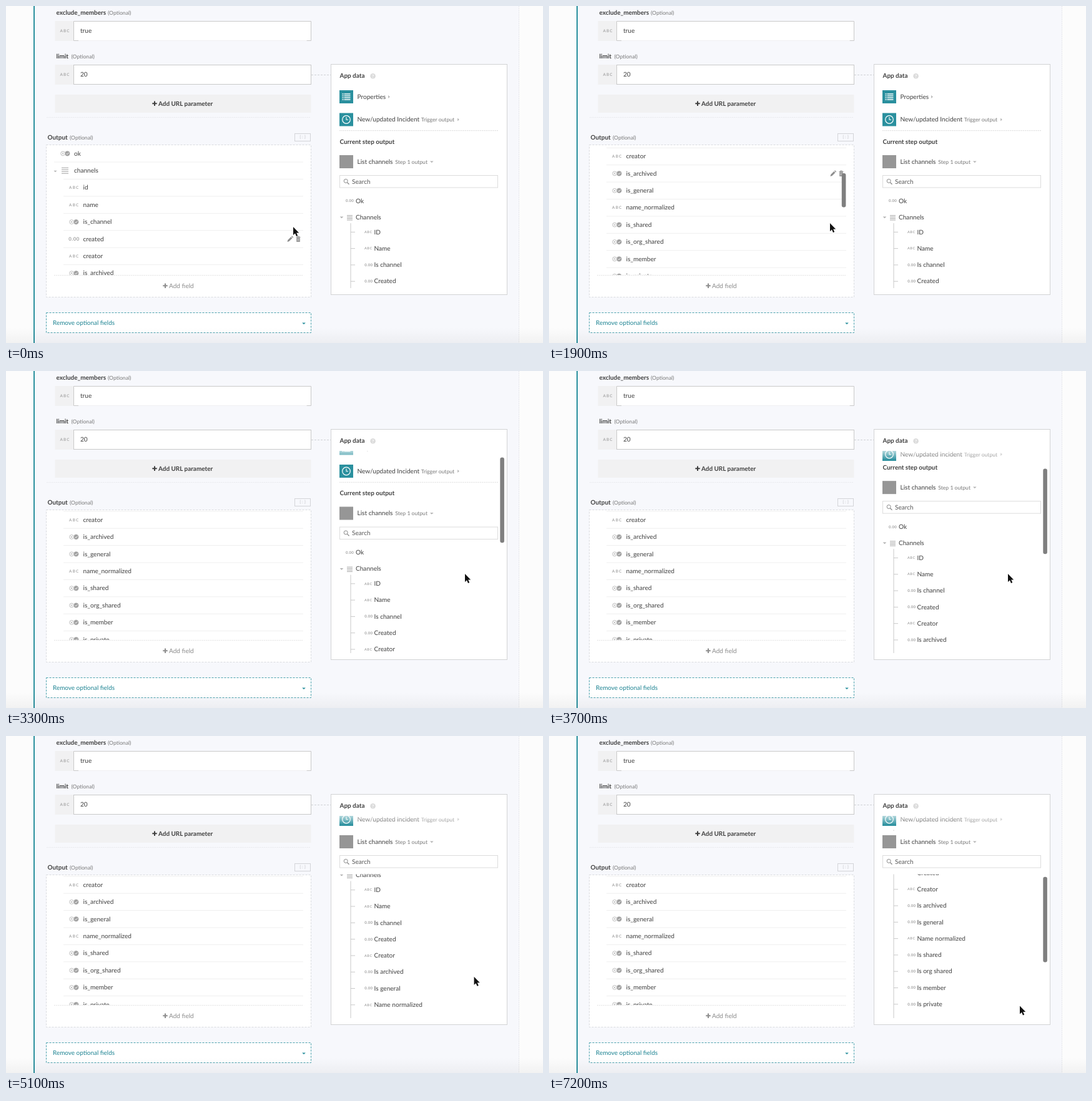
Animation, 860 px wide and 540 px high, one loop 7.3 s. Source, as an HTML page:

```html
<!DOCTYPE html>
<html lang="en">
<head>
<meta charset="utf-8">
<title>Output fields</title>
<style>
html, body { margin: 0; width: 860px; height: 540px; overflow: hidden; background: #fcfcfc; }
svg { display: block; }
text { font-family: Lato, "Open Sans", sans-serif; text-rendering: geometricPrecision; white-space: pre; }
</style>
</head>
<body>
<svg id="stage" width="860" height="540" viewBox="0 0 860 540">
  <defs>
    <clipPath id="listClip"><rect x="65" y="223" width="423" height="208"/></clipPath>
    <clipPath id="panelClip"><rect x="521" y="128" width="281" height="324"/></clipPath>
    <linearGradient id="topFade" x2="0" y2="1">
      <stop offset="0" stop-color="#fff" stop-opacity=".65"/><stop offset="1" stop-color="#fff" stop-opacity="0"/>
    </linearGradient>
    <linearGradient id="floor" x2="0" y2="1">
      <stop offset="0" stop-opacity="0"/><stop offset="1" stop-opacity=".04"/>
    </linearGradient>
  </defs>
</svg>
<script>
const NS = 'http://www.w3.org/2000/svg';
const stage = document.getElementById('stage');
const INK = '#404040', TEAL = '#2a909e', GREY = '#a0a0a0';

function el(parent, tag, attrs) {
  const node = document.createElementNS(NS, tag);
  for (const key in attrs) node.setAttribute(key, attrs[key]);
  return parent.appendChild(node);
}
const group = (parent, attrs) => el(parent, 'g', attrs);
const path = (p, d, attrs) => el(p, 'path', { d, fill: 'none', ...attrs });
const box = (p, x, y, width, height, fill, attrs) => el(p, 'rect', { x, y, width, height, fill, ...attrs });
const line = (p, x1, y1, x2, y2, stroke, attrs) => el(p, 'line', { x1, y1, x2, y2, stroke, ...attrs });

// y is the middle of the capitals
function text(p, x, y, str, { size = 10.1, fill = INK, weight = 400, ...rest } = {}) {
  const node = el(p, 'text', { x, y: y + size * 0.32, 'font-size': size, fill, 'font-weight': weight, ...rest });
  node.textContent = str;
  return node;
}
const bold = (p, x, y, str) => text(p, x, y, str, { size: 9.95, weight: 700 });
const note = (p, x, y, str) => text(p, x, y, str, { size: 8.6, fill: '#777' });
const plus = (p, x, y, stroke) =>
  path(p, `M${x - 3.7} ${y}h7.4M${x} ${y - 3.7}v7.4`, { stroke, 'stroke-width': 2 });
const bars = (p, x, y, w, gap, n, stroke) => {
  for (let i = 0; i < n; i++) line(p, x, y + (i - (n - 1) / 2) * gap, x + w, y + (i - (n - 1) / 2) * gap, stroke);
};
const caret = (p, x, y, fill, r = 3) => path(p, `M${x - r} ${y - r / 2}h${2 * r}l${-r} ${r}z`, { fill });
const chevron = (p, x, y) => path(p, `M${x - 1.3} ${y - 2.4}l2.6 2.4l-2.6 2.4z`, { fill: '#b5b5b5' });

function typeIcon(p, x, y, type, small) {
  if (type === 'bool') {
    el(p, 'circle', { cx: x + 3.6, cy: y, r: 3.4, fill: 'none', stroke: '#b0b0b0', 'stroke-width': .8 });
    path(p, `M${x + 2.3} ${y - 1.3}l2.6 2.6m0-2.6l-2.6 2.6`, { stroke: '#a8a8a8', 'stroke-width': .8 });
    el(p, 'circle', { cx: x + 10.8, cy: y, r: 4.3, fill: '#a0a0a0', stroke: '#fff', 'stroke-width': .6 });
    path(p, `M${x + 9} ${y}l1.4 1.4l2.6-2.8`, { stroke: '#fff' });
  } else if (type === 'num') {
    text(p, x - (small ? .3 : 1.2), y, '0.00', {
      size: small ? 6 : 7.8, fill: GREY, weight: 700, 'letter-spacing': small ? .35 : .55 });
  } else {
    text(p, x - .4, y, 'ABC', {
      size: small ? 5.4 : 6.3, fill: '#a8a8a8', weight: 700, 'letter-spacing': small ? .5 : 1.2 });
  }
}

function field(y, label, labelEnd, value, open) {
  bold(stage, 80.5, y - 29, label);
  note(stage, labelEnd + 4, y - 28.5, '(Optional)');
  box(stage, 78.5, y - 16, 30, 32, '#f1f1f2');
  box(stage, 108.5, y - 15.5, 380, 31, '#fff', open ? {} : { stroke: '#c9c9c9' });
  if (open) {
    path(stage, `M116 ${y + 15.5}h-7.5v-31h380v31h-7`, { stroke: '#c9c9c9' });
    line(stage, 116, y + 15.5, 481, y + 15.5, '#f0f0f2');
  }
  typeIcon(stage, 86.8, y, 'abc');
  text(stage, 119, y, value);
}

// Page and left column
box(stage, 45, 0, 776, 540, '#f7f8fc');
box(stage, 44, 0, 2, 540, TEAL);
line(stage, 821.5, 0, 821.5, 540, '#e4e6ea', { 'stroke-dasharray': '2 1' });
field(40, 'exclude_members', 159, 'true', true);
field(110, 'limit', 100.5, '20', false);
box(stage, 78.5, 142, 410, 29, '#f1f1f2');
plus(stage, 238, 156.2, INK);
bold(stage, 244, 156.5, 'Add URL parameter');
line(stage, 65, 178.5, 488, 178.5, '#e9eaee', { 'stroke-dasharray': '2 1' });
bold(stage, 66.5, 211, 'Output');
note(stage, 102, 211.5, '(Optional)');
box(stage, 462.5, 204.5, 25, 12, 'none', { stroke: '#d3d4d8' });
text(stage, 475, 210, '{ : }', { size: 7, fill: '#c4c5ca', 'text-anchor': 'middle' });

// Field list
box(stage, 64.5, 222.5, 424, 244, '#fff', { stroke: '#d9dbdf', 'stroke-dasharray': '3 2' });
line(stage, 77, 431.5, 476, 431.5, '#e4e4e4', { 'stroke-dasharray': '2 1' });
plus(stage, 255, 448.2, '#8d8d8d');
text(stage, 261, 448.5, 'Add field', { fill: '#8d8d8d' });

const FIELDS = [
  ['id', 'abc'], ['name', 'abc'], ['is_channel', 'bool'], ['created', 'num'], ['creator', 'abc'],
  ['is_archived', 'bool'], ['is_general', 'bool'], ['name_normalized', 'abc'], ['is_shared', 'bool'],
  ['is_org_shared', 'bool'], ['is_member', 'bool'], ['is_private', 'bool']
];
const listView = group(stage, { 'clip-path': 'url(#listClip)' });
const list = group(listView);
const rowY = i => 236.4 + 27.4 * i;
typeIcon(list, 87.5, rowY(0), 'bool');
text(list, 109, rowY(0), 'ok');
line(list, 77, 250, 476, 250, '#efefef');
caret(list, 79, 265, '#b5b5b5', 2.6);
bars(list, 89, rowY(1), 11, 3, 4, '#a3a3a3');
text(list, 109, rowY(1), 'channels');
line(list, 92, 277.4, 476, 277.4, '#efefef');
FIELDS.forEach(([name, type], i) => {
  const y = rowY(i + 2);
  typeIcon(list, 101.5, y, type);
  text(list, 123.5, y, name);
  line(list, 92, y + 13.7, 476, y + 13.7, '#efefef');
});
const tools = group(list);
path(tools, 'M450.5 4.5l.8-3l5-5l2.2 2.2l-5 5zM457-4.2l1-.9l2.2 2.2l-1 .9z', { fill: '#8e8e8e' });
path(tools, 'M464.5-2.8h7M466.5-3v-1.3h3v1.3', { stroke: '#8e8e8e' });
path(tools, 'M465.2-2h5.6v6.5h-5.6z', { fill: '#8e8e8e' });
path(tools, 'M467-.5v3.6m2-3.6v3.6', { stroke: '#fff', 'stroke-width': .6 });
const listThumb = box(stage, 468.8, 0, 6.6, 54.5, '#7f7f7f', { rx: 3 });

// Drop-down
box(stage, 64.5, 491.5, 424, 32, '#fff', { stroke: '#4ba1ad', 'stroke-dasharray': '3 2' });
text(stage, 75, 507.8, 'Remove optional fields', { size: 9.95, fill: '#1f8493' });
caret(stage, 477, 508.8, TEAL, 2.8);

// Data panel
line(stage, 489, 110.5, 520, 110.5, '#cfd1d5', { 'stroke-dasharray': '3 2' });
box(stage, 520.5, 93.5, 282, 369, '#fff', { stroke: '#d2d3d4' });
bold(stage, 534.5, 111.5, 'App data');
el(stage, 'circle', { cx: 587.6, cy: 112.2, r: 4.3, fill: '#dcdcdc' });
text(stage, 587.6, 112.5, '?', { size: 7, fill: '#fff', weight: 700, 'text-anchor': 'middle' });

const panel = group(stage, { 'clip-path': 'url(#panelClip)' });
const tree = group(panel);
const tile = (p, y, fill) => box(p, 534, y - 10.5, 22, 21, fill);

tile(tree, 145.5, TEAL);
for (const dy of [-4.5, -1.5, 1.5, 4.5])
  path(tree, `M538.5 ${145.5 + dy}h2m1 0h10`, { stroke: '#fff', 'stroke-width': 1.5 });
text(tree, 562.5, 145.5, 'Properties');
chevron(tree, 613.5, 145.5);
line(tree, 534, 199.7, 788, 199.7, '#dadada', { 'stroke-dasharray': '2 1' });
bold(tree, 534.5, 217.5, 'Current step output');

typeIcon(tree, 544.2, 312.5, 'num', true);
text(tree, 560, 312.5, 'Ok');
caret(tree, 537.5, 338.8, '#b0b0b0', 2.8);
bars(tree, 546, 339.3, 9, 2.4, 4, '#a6a6a6');
text(tree, 560, 338.7, 'Channels');
line(tree, 552, 348, 552, 700, '#c9c9c9');
FIELDS.forEach(([name, type], i) => {
  const y = 362.3 + 26.3 * i;
  const words = name.replace(/_/g, ' ');
  const label = name === 'id' ? 'ID' : words[0].toUpperCase() + words.slice(1);
  line(tree, 552, y, 559, y, '#c9c9c9');
  typeIcon(tree, 574.5, y, type === 'abc' ? 'abc' : 'num', true);
  text(tree, 589.5, y, label);
});

// Sticky parts of the panel
const step = group(panel);
box(step, 522, 232, 270, 69.5, '#fff');
tile(step, 249.5, '#969696');
text(step, 562.5, 249.5, 'List channels');
note(step, 623.3, 250, 'Step 1 output');
caret(step, 681.8, 249.8, '#b5b5b5', 2.8);
box(step, 534.5, 271.5, 253, 19.5, '#fff', { stroke: '#dcdcdc' });
el(step, 'circle', { cx: 544.2, cy: 280.4, r: 3, fill: 'none', stroke: '#888' });
line(step, 546.4, 282.6, 549.5, 285.7, '#888', { 'stroke-width': 1.3 });
text(step, 554, 281.5, 'Search', { fill: '#5a5a5a' });

const trigger = group(panel);
box(trigger, 522, 168, 270, 31, '#fff');
tile(trigger, 182, TEAL);
el(trigger, 'circle', { cx: 545, cy: 182, r: 6.3, fill: 'none', stroke: '#fff', 'stroke-width': 1.2 });
path(trigger, 'M545 178v4.2h3', { stroke: '#fff', 'stroke-width': 1.1 });
const triggerName = text(trigger, 562.5, 182, '');
note(trigger, 664.8, 182.3, 'Trigger output');
chevron(trigger, 724.5, 182);

const fade = box(panel, 522, 128, 270, 15, 'url(#topFade)');
const panelThumb = box(stage, 791.3, 0, 6.6, 136.8, '#7f7f7f', { rx: 3 });

box(stage, 0, 515, 860, 25, 'url(#floor)');
const cursor = path(stage, 'M0 0v13l3-2.7l2 4.7l2.2-.9l-2-4.7h4z',
  { fill: '#111', stroke: '#fff', 'stroke-width': .9, 'paint-order': 'stroke' });

// Motion: [ms, value]
const LOOP = 7300, STEP = 100;
const KEYS = {
  x: [[0, 460], [200, 450], [2300, 450], [2500, 500], [2800, 700], [3000, 735], [4500, 735], [5200, 752], [5500, 767], [5700, 754]],
  y: [[0, 354], [200, 348], [2300, 348], [2500, 346], [2800, 331], [3000, 325], [4500, 325], [5200, 396], [5500, 440], [5700, 432.5]],
  list: [[600, 0], [800, 10], [1100, 57.5], [1300, 78], [1450, 82], [1600, 100], [1900, 159.8], [2100, 162.3]],
  listBar: [[600, 0], [700, 1], [2300, 1], [2600, 0]],
  panel: [[3000, 0], [3100, 4], [3300, 21.5], [4100, 104.2], [4300, 115.6], [6300, 115.6], [6500, 128], [7000, 208], [7200, 221.8]],
  panelBar: [[3000, 0], [3100, 1], [4500, 1], [4900, 0], [6300, 0], [6400, 1]]
};
const HOVER = [[0, 5], [100, 4], [1400, 7], [2200, 10], [2500, -1]];

function at(keys, t) {
  let prev = keys[0];
  for (const key of keys) {
    if (t < key[0]) {
      const k = Math.max(0, (t - prev[0]) / (key[0] - prev[0]));
      return prev[1] + (key[1] - prev[1]) * k;
    }
    prev = key;
  }
  return prev[1];
}
const move = (node, x, y) => node.setAttribute('transform', `translate(${x} ${y})`);

function draw(t) {
  const v = {};
  for (const name in KEYS) v[name] = at(KEYS[name], t);
  move(cursor, v.x, v.y);

  move(list, 0, -v.list);
  const hovered = HOVER.filter(h => h[0] <= t).pop()[1];
  tools.setAttribute('opacity', hovered < 0 ? 0 : 1);
  move(tools, 0, rowY(hovered));
  move(listThumb, 0, 224.3 + v.list * .273);
  listThumb.setAttribute('opacity', v.listBar);

  const stuck = v.panel > 48.5;
  move(tree, 0, -v.panel);
  move(step, 0, -Math.min(v.panel, 80));
  move(trigger, 0, -Math.min(v.panel, 48.5));
  triggerName.textContent = stuck ? 'New/updated incident' : 'New/updated Incident';
  fade.setAttribute('opacity', v.panel > 0 ? 1 : 0);
  move(panelThumb, 0, 129.1 + v.panel * .436);
  panelThumb.setAttribute('opacity', v.panelBar);
}

const start = performance.now();
function tick() {
  const t = (performance.now() - start) % LOOP;
  draw(Math.floor(t / STEP) * STEP);
  requestAnimationFrame(tick);
}
tick();
</script>
</body>
</html>
```
